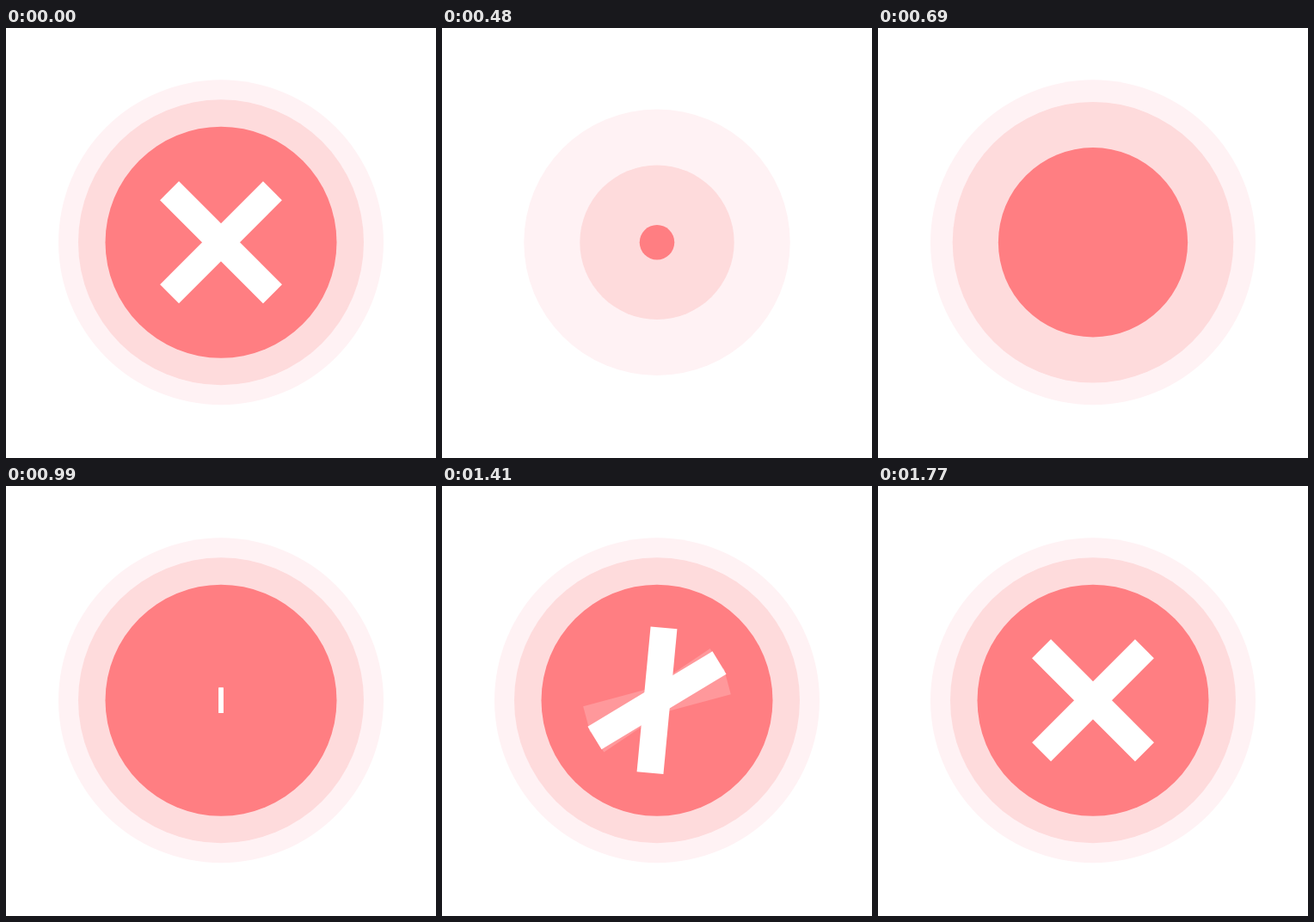
An HTML page for the animation above (2250 ms loop, 500 by 500 pixels).

```html
<!DOCTYPE html>
<html lang="en">
<head>
<meta charset="utf-8">
<title>Error badge</title>
<style>
  html, body { margin: 0; width: 100%; height: 100%; overflow: hidden; background: #fff; }
  svg { display: block; width: 100%; height: 100%; }
</style>
</head>
<body>
<svg id="stage" viewBox="0 0 500 500"></svg>
<script>
const LOOP = 2250;
const STEP = 30;
const INTRO = 120; // the finished badge is held this long before it restarts
const CENTER = "translate(250 249.25)";

const circles = [
  { radius: 189, color: "#fff2f4", start: 120 },
  { radius: 166, color: "#fedbdc", start: 210 },
  { radius: 134.5, color: "#ff7e82", start: 330 }
];
const CIRCLE_TIME = 540;

// Bars leave the vertical clockwise; the faint ones accompany the second arm.
const bars = [
  { angle: 135, start: 1136, time: 540, opacity: 0.2 },
  { angle: 135, start: 1130, time: 640, opacity: 0.2 },
  { angle: 135, start: 1118, time: 652, opacity: 1 },
  { angle: 45, start: 1289, time: 481, opacity: 1 }
];
const BAR = { width: 31, length: 169.5, start: 960, time: 270 };

const clamp = x => Math.min(1, Math.max(0, x));
const progress = (t, start, time) => clamp((t - start) / time);

// Cubic bezier (0.475, 0, 0.471, 1), solved for x by bisection.
function ease(x) {
  if (x <= 0 || x >= 1) return clamp(x);
  let low = 0, high = 1;
  for (let i = 0; i < 30; i++) {
    const u = (low + high) / 2, v = 1 - u;
    const bx = 3 * v * v * u * 0.475 + 3 * v * u * u * 0.471 + u * u * u;
    if (bx < x) low = u; else high = u;
  }
  return low * low * (3 - 2 * low);
}

function add(name, attributes) {
  const node = document.createElementNS("http://www.w3.org/2000/svg", name);
  for (const key in attributes) node.setAttribute(key, attributes[key]);
  document.getElementById("stage").appendChild(node);
  return node;
}

for (const c of circles) {
  c.node = add("circle", { fill: c.color, transform: CENTER });
}
for (const b of bars) {
  b.node = add("rect", {
    x: -BAR.width / 2, y: -BAR.length / 2,
    width: BAR.width, height: BAR.length,
    fill: "#fff", "fill-opacity": b.opacity
  });
}

function draw(ms) {
  let t = Math.floor((ms % LOOP) / STEP + 0.02) * STEP;
  if (t < INTRO) t += LOOP;
  for (const c of circles) {
    c.node.setAttribute("r", c.radius * ease(progress(t, c.start, CIRCLE_TIME)));
  }
  const scale = Math.sin(progress(t, BAR.start, BAR.time) * Math.PI / 2);
  for (const b of bars) {
    const angle = b.angle * ease(progress(t, b.start, b.time));
    b.node.setAttribute("transform", `${CENTER} rotate(${angle}) scale(${scale})`);
    b.node.setAttribute("visibility", scale > 0 ? "visible" : "hidden");
  }
}

const begin = performance.now();
function tick() {
  draw(performance.now() - begin);
  requestAnimationFrame(tick);
}
tick();
</script>
</body>
</html>
```
